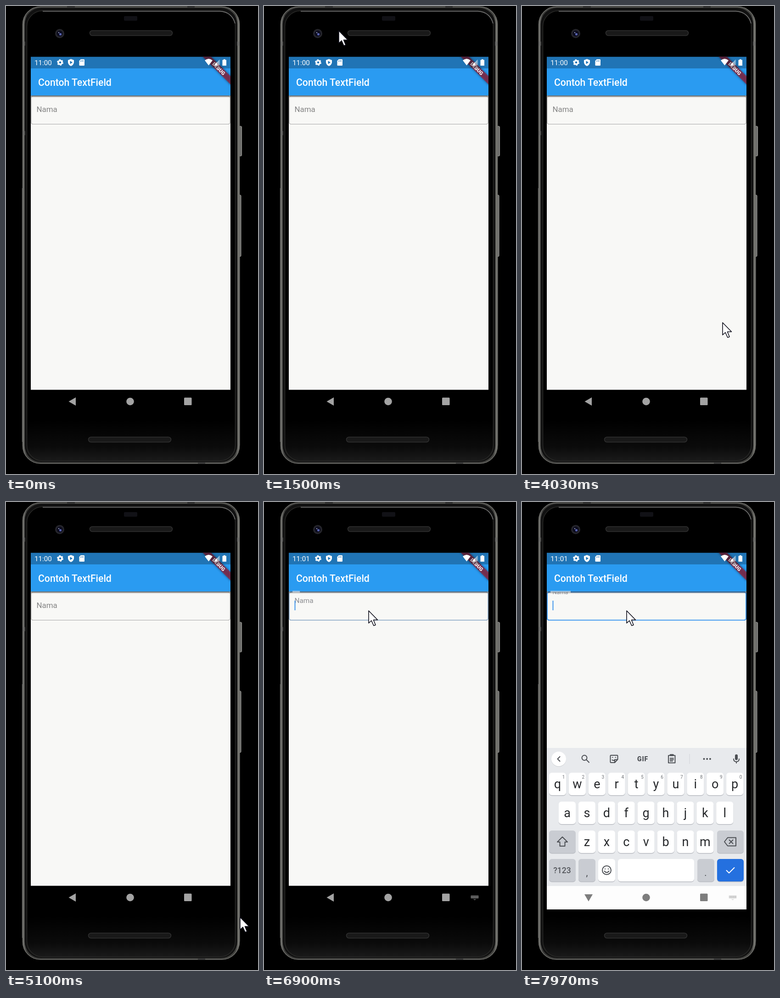
Write an HTML page that moves like this. It is 549 px wide and 1020 px high and loops after 8 s.

```html
<!DOCTYPE html>
<html lang="id">
<head>
<meta charset="utf-8">
<title>Contoh TextField</title>
<style>
  html, body { margin: 0; width: 100%; height: 100%; overflow: hidden; background: #000; }
  svg { display: block; width: 549px; height: 1020px; }
  text { font-family: Roboto, Arial, sans-serif; }
  .mid { text-anchor: middle; }
  .line { fill: none; stroke: #4b4e53; stroke-width: 2; stroke-linecap: round; stroke-linejoin: round; }
</style>
</head>
<body>
<svg viewBox="0 0 549 1020">
  <defs>
    <linearGradient id="glass" x2="0" y2="1">
      <stop offset=".91" stop-color="#000"/>
      <stop offset=".97" stop-color="#0b0b0b"/>
      <stop offset="1" stop-color="#1a1a1a"/>
    </linearGradient>
    <linearGradient id="metal">
      <stop stop-color="#7c7c78"/>
      <stop offset=".02" stop-color="#3a3a38"/>
      <stop offset=".98" stop-color="#42423f"/>
      <stop offset="1" stop-color="#85857f"/>
    </linearGradient>
    <linearGradient id="shade" x2="0" y2="1">
      <stop stop-opacity=".55"/>
      <stop offset=".5" stop-opacity=".25"/>
      <stop offset="1" stop-opacity="0"/>
    </linearGradient>
    <filter id="blur" x="-20%" y="-80%" width="140%" height="260%"><feGaussianBlur stdDeviation="2.5"/></filter>
    <clipPath id="screen"><path d="M54 110.500H489V888H54Z"/></clipPath>
    <clipPath id="body"><path d="M54 194H489V836.500H54Z"/></clipPath>
  </defs>

  <!-- phone -->
  <rect width="549" height="1020"/>
  <g fill="#6e6e6b" stroke="#a0a09c" stroke-width="1">
    <rect x="505" y="262" width="8.5" height="65" rx="2"/>
    <rect x="505" y="412" width="7" height="134" rx="2"/>
  </g>
  <rect x="36" y="1" width="473" height="996.500" rx="39" fill="url(#metal)"/>
  <rect x="36.500" y="1.500" width="472" height="995.500" rx="38.500" fill="none" stroke="#70706c" stroke-width="1.500"/>
  <rect x="40.500" y="4" width="463.500" height="990" rx="36" fill="#111"/>
  <rect x="45.5" y="10.5" width="454" height="981" rx="34" fill="url(#glass)" stroke="#2a2a28" stroke-width="1.500"/>
  <path d="M80 11.500H466Q492 13 499 38" fill="none" stroke="#777" stroke-width="1.5"/>
  <path d="M35.500 397V950M509 547V958" stroke="#5a5a57" stroke-width="1.5"/>
  <path d="M36 82H42M503 82H509M36 277H42" stroke="#666" stroke-width="9" opacity=".5"/>
  <path d="M395 2H411M133 2H150M418 996H434" stroke="#333" stroke-width="3"/>
  <rect x="257" y="22" width="29" height="10" rx="2" fill="#111116"/>
  <g fill="#191919" stroke="#303030" stroke-width="1.5">
    <rect x="182.5" y="53.5" width="180" height="11" rx="5.5"/>
    <rect x="179.5" y="939.5" width="180" height="11" rx="5.5"/>
  </g>
  <circle cx="117" cy="60" r="10" fill="#25252b"/>
  <circle cx="117" cy="60" r="6.5" fill="#0b0b1d"/>
  <circle cx="118.5" cy="61.5" r="2.6" fill="#5661ac"/>
  <circle cx="115" cy="58" r="1.3" fill="#8b91b5"/>

  <!-- app -->
  <g clip-path="url(#screen)">
    <rect x="54" y="111" width="435" height="725.500" fill="#f8f8f6"/>
    <g clip-path="url(#body)">
      <path id="border" fill="none"/>
      <rect id="gap" x="62" y="194" height="4" fill="#fff"/>
      <text id="label" x="66.5">Nama</text>
    </g>
    <rect id="caret" x="66.5" y="215" width="2" height="21" fill="#4296ec"/>
    <rect x="54" y="195" width="435" height="5" fill="url(#shade)"/>
    <rect x="54" y="110.500" width="435" height="84.500" fill="#2a9bf1"/>
    <rect id="notch" x="62" y="193.5" height="3" fill="#c3d6e8" opacity=".7"/>
    <text x="70" y="173.5" font-size="21.2" font-weight="500" fill="#fff">Contoh TextField</text>
    <g transform="translate(489 111) rotate(45)">
      <rect x="-44" y="29.6" width="88" height="12.7" opacity=".5" filter="url(#blur)"/>
      <rect x="-44" y="29.6" width="88" height="12.7" fill="#98203c" fill-opacity=".72"/>
      <text class="mid" y="39.8" font-size="10.8" font-weight="900" fill="#fff">DEBUG</text>
    </g>
    <rect x="54" y="110.500" width="435" height="25.500" fill-opacity=".25"/>

    <g fill="#fff">
      <text id="clock" x="62" y="129" font-size="15.2"></text>
      <circle cx="118" cy="123" r="4" fill="none" stroke="#fff" stroke-width="3.4"/>
      <circle cx="118" cy="123" r="5.9" fill="none" stroke="#fff" stroke-width="2.2" stroke-dasharray="3.1 3.08"/>
      <path d="M141.500 115.500L148 118V123Q147.500 128 141.500 131Q135.500 128 135 123V118Z"/>
      <path d="M139.500 119.500L145 123 139.500 126.500Z" fill="#2176b8"/>
      <path d="M163 116H169.500Q171 116 171 117.500V128.500Q171 130 169.500 130H161Q159.500 130 159.500 128.500V119.500Z"/>
      <path d="M162.500 119V121.500M165.300 118V121.500M168 118V121.500" stroke="#2176b8"/>
      <path d="M433 118.500Q441.500 111.500 450 118.500L441.500 129.500Z"/>
      <path d="M453 129.500L465.500 116.500V129.500Z" fill-opacity=".5"/>
      <path d="M453 129.500L460 122V129.500Z"/>
      <path d="M474 116H477.500V117.500H480V130H471.500V117.500H474Z"/>
    </g>

    <g id="board"></g>
    <g id="nav">
      <path id="back" d="M-8.500 0L7 -9V9Z"/>
      <circle cx="270.500" cy="862" r="8.300"/>
      <rect x="388" y="853.500" width="16.500" height="16.500" rx="1.500"/>
    </g>
    <g id="ime">
      <rect x="450.500" y="857.500" width="17" height="6.500" rx="1"/>
      <path d="M455.500 865.500H462.500L459 868Z"/>
      <path d="M452.500 859.500H466M452.500 862H466" stroke="#000" stroke-opacity=".35" stroke-dasharray="1 1.500"/>
    </g>
  </g>

  <path id="mouse" d="M0 0V27L6 21.500 11 32.500 15 31 10.500 20H19.500Z" fill="#fff" stroke="#10101c" stroke-width="1.600" stroke-linejoin="round"/>
</svg>

<script>
const LOOP = 8000, FOCUS = 6840, RISE = 7098, PITCH = 42.9;
const $ = id => document.getElementById(id);

// Pointer stops: time, x, y
const stops = [
  [1420, 150, -40], [1500, 163, 54], [1900, 230, 330], [2500, 420, 560],
  [2900, 522, 600], [3400, 522, 680], [3800, 445, 690], [4030, 437, 690],
  [4300, 437, 700], [4800, 505, 890], [5100, 510, 905], [5700, 510, 905],
  [5950, 250, 700], [6200, 6, 420], [6600, 228, 237]
];

const clamp = v => Math.min(1, Math.max(0, v));
const mix = (a, b, k) => a + (b - a) * k;
const smooth = k => k * k * (3 - 2 * k);

// Material standard curve, cubic-bezier(.4, 0, .2, 1)
function standard(x) {
  let lo = 0, hi = 1;
  for (let i = 0; i < 20; i++) {
    const u = (lo + hi) / 2, v = 1 - u;
    if (1.2 * v * v * u + .6 * v * u * u + u ** 3 < x) lo = u; else hi = u;
  }
  return 3 * lo * lo - 2 * lo ** 3;
}

function key(x, y, w, fill = '#fff') {
  return `<rect x="${x}" y="${y + 1.5}" width="${w}" height="49" rx="6" fill="#b9bcc2"/>
    <rect x="${x}" y="${y}" width="${w}" height="49" rx="6" fill="${fill}"/>`;
}

function letters(row, cx, y) {
  return [...row].map((c, i) => {
    const x = cx + i * PITCH;
    return key(x - 18.5, y, 37) +
      `<text class="mid" x="${x}" y="${y + 33.5}" font-size="27" fill="#26282b">${c}</text>`;
  }).join('');
}

function buildBoard() {
  const gray = '#c9ccd2';
  const hints = [...'1234567890'].map((d, i) =>
    `<text class="mid" x="${90.5 + i * PITCH}" y="602.5" font-size="10" fill="#6b6e73">${d}</text>`).join('');
  $('board').innerHTML = `
    <rect x="54" y="536" width="435" height="301" fill="#e8eaed"/>
    <rect x="54" y="837" width="435" height="51" fill="#fdfdfd"/>
    <circle cx="80" cy="561" r="16" fill="#c9ccd0"/>
    <circle cx="80" cy="560" r="16" fill="#fff"/>
    <g class="line">
      <path d="M82.500 555L77.500 560 82.500 565"/>
      <circle cx="136" cy="557.500" r="5.500"/><path d="M140.500 562L146 567.500"/>
      <path d="M194 552H207Q208.500 552 208.500 553.500V561L202 568H194Q192.500 568 192.500 566.500V553.500Q192.500 552 194 552ZM202 567.500V561.500H208M196.500 562Q199 564.500 201 562.500M197 556.500H197.500M203.500 556.500H204"/>
      <path d="M319 552.500H333.500V568.500H319ZM322.500 558.500H330M322.500 561.500H330M322.500 564.500H328"/>
      <path d="M323.500 551.500H329" stroke-width="4"/>
      <path d="M461 560Q461 566 467 566Q473 566 473 560M467 566V569"/>
      <path d="M467 553V559.500" stroke-width="6"/>
    </g>
    <text class="mid" x="263" y="565" font-size="14" font-weight="900" letter-spacing=".8" fill="#4b4e53">GIF</text>
    <path d="M365 549V571" stroke="#d0d3d7"/>
    <path d="M396.500 560H411" stroke="#4b4e53" stroke-width="4" stroke-linecap="round" stroke-dasharray="0 6.700"/>
    ${letters('qwertyuiop', 77.5, 590)}${hints}
    ${letters('asdfghjkl', 98.5, 653)}
    ${key(59, 716, 58, gray)}${letters('zxcvbnm', 141.5, 716)}${key(425, 716, 58, gray)}
    ${key(59, 778, 58, gray)}${key(123, 778, 37, gray)}${key(166, 778, 37)}
    ${key(209, 778, 166)}${key(382, 778, 37, gray)}${key(425, 778, 58, '#2470df')}
    <g class="line">
      <path d="M88 730L99 741H93.500V750H82.500V741H77Z"/>
      <path d="M448 731.500H466V749.500H448L441 740.500ZM451.500 736.500L459.500 744.500M459.500 736.500L451.500 744.500"/>
      <circle cx="184.500" cy="802.500" r="9.500"/>
      <path d="M179.500 804.500Q184.500 810.500 189.500 804.500M181 799.500V800M188 799.500V800"/>
      <path d="M445.500 803L451 808.500 462.500 797" stroke="#fff"/>
    </g>
    <text class="mid" x="87.500" y="809" font-size="17.500" font-weight="500" fill="#54575c">?123</text>
    <text class="mid" x="141.500" y="815" font-size="20" fill="#44474b">,</text>
    <text class="mid" x="400" y="815" font-size="20" fill="#44474b">.</text>`;
}

function drawMouse(t) {
  const shown = t >= stops[0][0];
  $('mouse').style.display = shown ? '' : 'none';
  if (!shown) return;
  const i = stops.findLastIndex(s => s[0] <= t);
  const a = stops[i], b = stops[i + 1] || a;
  const k = a === b ? 0 : smooth((t - a[0]) / (b[0] - a[0]));
  $('mouse').setAttribute('transform', `translate(${mix(a[1], b[1], k)} ${mix(a[2], b[2], k)})`);
}

function drawField(t) {
  const k = standard(clamp((t - FOCUS) / 200)), gap = 44 * k;
  const border = $('border'), label = $('label');
  border.setAttribute('d', `M${62 + gap} 196.500H484q4 0 4 4V253.500q0 4 -4 4H59q-4 0 -4 -4V200.500q0 -4 4 -4H62`);
  border.setAttribute('stroke', `rgb(${mix(165, 66, k)},${mix(165, 154, k)},${mix(165, 240, k)})`);
  border.setAttribute('stroke-width', mix(1.2, 2.2, k));
  $('gap').setAttribute('width', gap);
  $('notch').setAttribute('width', gap);
  label.setAttribute('y', mix(231, 200.5, k));
  label.setAttribute('font-size', mix(16.9, 12.7, k));
  label.setAttribute('fill', `rgb(${mix(132, 150, k)},${mix(132, 155, k)},${mix(132, 165, k)})`);
  const on = t >= FOCUS && Math.floor((t - FOCUS) / 500) % 2 === 0;
  $('caret').style.display = on ? '' : 'none';
}

function drawBoard(t) {
  const up = t >= RISE;
  const drop = 352 * (1 - clamp((t - RISE) / 300)) ** 4;
  $('board').style.display = up ? '' : 'none';
  $('board').setAttribute('transform', `translate(0 ${drop})`);
  $('nav').setAttribute('fill', up ? '#7d7d7d' : '#a3a3a3');
  const turn = -90 * smooth(clamp((t - RISE) / 165));
  $('back').setAttribute('transform', `translate(145 862) rotate(${turn})`);
  $('ime').setAttribute('fill', up ? '#dedede' : '#a3a3a3');
  $('ime').setAttribute('opacity', up ? clamp((t - 7300) / 100) : clamp((t - 6840) / 100));
}

function draw(t) {
  $('clock').textContent = t < 6000 ? '11:00' : '11:01';
  drawField(t);
  drawBoard(t);
  drawMouse(t);
}

buildBoard();
draw(0);
let start;
requestAnimationFrame(function tick(now) {
  start ??= now;
  draw((now - start) % LOOP);
  requestAnimationFrame(tick);
});
</script>
</body>
</html>
```
